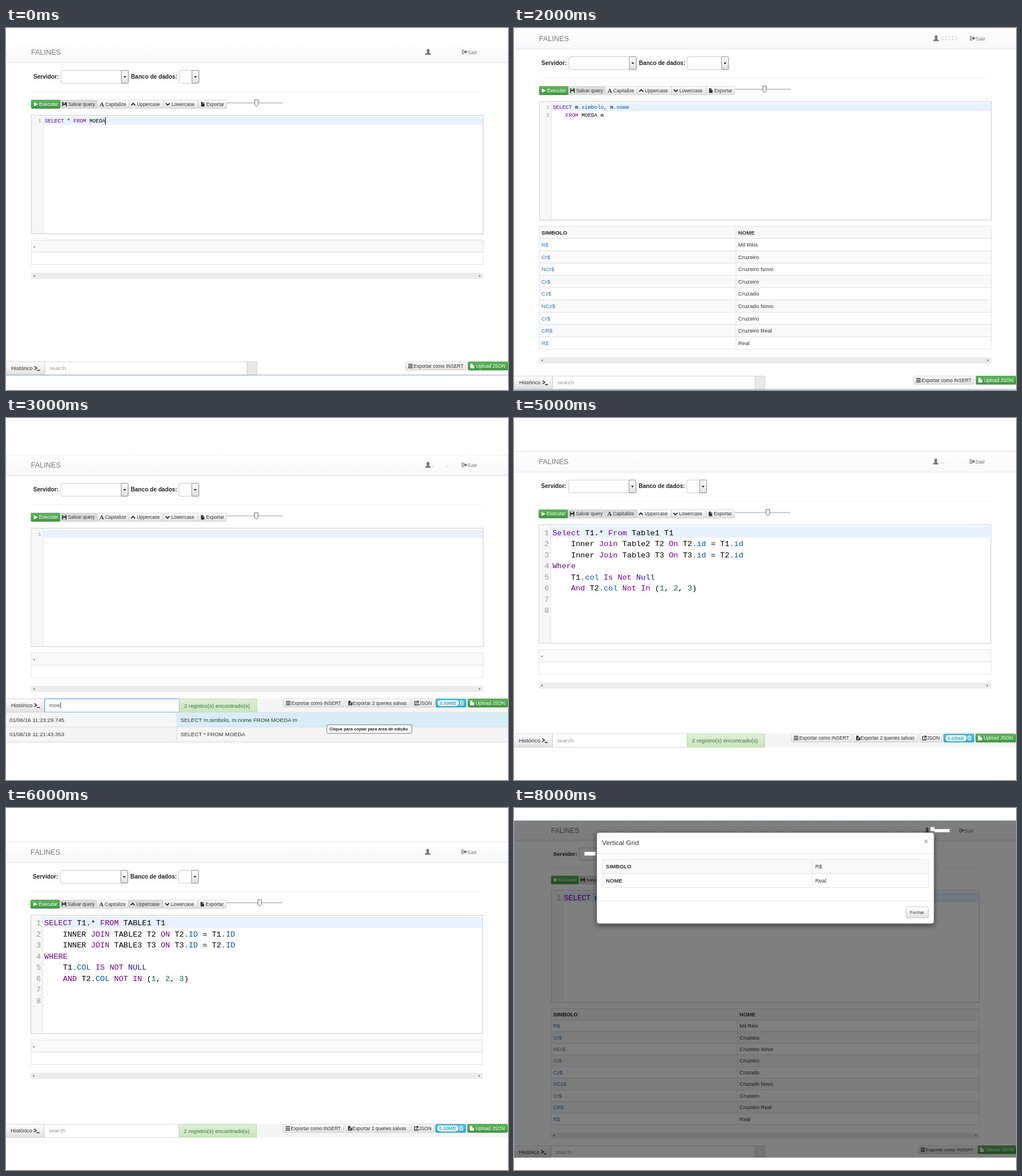
Recreate the animation shown at these times as an HTML page. Size 880x636 px, loop 9000 ms.

```html
<!DOCTYPE html>
<html lang="pt">
<head>
<meta charset="utf-8">
<style>
html, body { margin: 0; width: 100%; height: 100%; overflow: hidden; background: #fff; }
svg { display: block; width: 880px; height: 636px; font-family: "Liberation Sans", Arial, sans-serif; }
text { white-space: pre; }
.mono { font-family: "Liberation Mono", "Courier New", monospace; }
</style>
</head>
<body>
<svg id="stage" viewBox="0 0 880 636">
  <defs>
    <linearGradient id="head" x2="0" y2="1"><stop stop-color="#fff"/><stop offset="1" stop-color="#f8f8f8"/></linearGradient>
    <linearGradient id="plain" x2="0" y2="1"><stop stop-color="#fff"/><stop offset="1" stop-color="#e0e0e0"/></linearGradient>
    <linearGradient id="green" x2="0" y2="1"><stop stop-color="#5cb85c"/><stop offset="1" stop-color="#419641"/></linearGradient>
    <linearGradient id="blue" x2="0" y2="1"><stop stop-color="#5bc0de"/><stop offset="1" stop-color="#2aabd2"/></linearGradient>
    <linearGradient id="badge" x2="0" y2="1"><stop stop-color="#dff0d8"/><stop offset="1" stop-color="#c8e5bc"/></linearGradient>
    <filter id="shadow" x="-5%" y="-10%" width="110%" height="130%"><feDropShadow dx="0" dy="3" stdDeviation="5" flood-opacity=".5"/></filter>
  </defs>
</svg>
<script>
const STEP = 1000;
const stage = document.getElementById('stage');

const rect = (x, y, w, h, fill, stroke = 'none', extra = '') =>
  `<rect x="${x}" y="${y}" width="${w}" height="${h}" fill="${fill}" stroke="${stroke}" stroke-width=".8" ${extra}/>`;
const path = (d, fill, stroke = 'none', width = 1) =>
  `<path d="${d}" fill="${fill}" stroke="${stroke}" stroke-width="${width}"/>`;
const line = (d, color, width = .8) => path(d, 'none', color, width);
// Text is centred vertically on cy.
const text = (x, cy, str, size = 9.7, fill = '#333', extra = '') =>
  `<text x="${x}" y="${cy + size * .35}" font-size="${size}" fill="${fill}" ${extra}>${str}</text>`;
const group = (content, x, y, k = 1) => `<g transform="translate(${x} ${y}) scale(${k})">${content}</g>`;
const BOLD = 'font-weight="bold"';

// Icons are drawn around their own centre.
const icons = {
  play: c => path('M-3-3.6L4 0L-3 3.6Z', c),
  save: c => path('M-4-4H3L4-3V4H-4Z', c) + rect(-2, -4, 3.4, 2.6, '#ddd') + rect(-2.4, 1, 4.8, 3, '#ddd'),
  letter: c => text(-4, 0, 'A', 11, c, BOLD + ' font-family="Liberation Serif, serif"'),
  up: c => line('M-3.4 1.8L0-1.6L3.4 1.8', c, 2),
  down: c => line('M-3.4-1.8L0 1.6L3.4-1.8', c, 2),
  file: c => path('M-3-4H.5V-1H3V4H-3ZM1.2-4L3-1.8H1.2Z', c),
  bars: c => line('M-4-3H4M-4 0H4M-4 3H4', c, 1.6),
  sheet: c => path('M-3.5-4H.5V-1H3.5V4H-3.5Z', c) + line('M-1.8 2.6L1.8-.4M-1.5-.4L1.5 2.6', '#eee', .9),
  share: c => line('M1-3H-3V3.2H3V1', c, 1.3) + path('M0-4H4V0ZM-.8 .3L2.4-3L3.2-2L0 1.2Z', c),
  exit: c => line('M-.5-3.2H-4V3.2H-.5', c, 1.2) + path('M-2-1.2H1V-3.4L5 0L1 3.4V1.2H-2Z', c),
  user: c => `<ellipse cy="-2" rx="2.5" ry="3.3" fill="${c}"/>` + path('M-5 5C-5 2-2 2.6-1.4 .5H1.4C2 2.6 5 2 5 5Z', c),
  trash: c => line('M-3.5-2.6H3.5M-1.3-3.8H1.3M-2.6-2.4V3.7H2.6V-2.4M-1-1V2.4M1-1V2.4', c, 1),
};
const icon = (name, x, y, color = '#333') => group(icons[name](color), x, y);

const skins = { plain: ['url(#plain)', '#ccc', '#333'], active: ['#dcdcdc', '#c8c8c8', '#333'],
  green: ['url(#green)', '#3e8f3e', '#fff'], blue: ['url(#blue)', '#28a4c9', '#fff'] };

function button(x, cy, w, label, iconName, iconX, textX, skin = 'plain') {
  const [fill, stroke, ink] = skins[skin];
  return rect(x, cy - 7.3, w, 14.6, fill, stroke, 'rx="1.5"') + icon(iconName, iconX, cy, ink) + text(textX, cy, label, 8.4, ink);
}

function select(x, w) {
  const right = x + w;
  return rect(x, 50.5, w, 22.5, '#fff', '#bbb', 'rx="2"') + rect(right - 12.2, 50.5, 12.2, 22.5, 'url(#plain)', '#777', 'rx="1"') +
    path(`M${right - 8.6} 60.7h5l-2.5 2.8Z`, '#111');
}

const KEYWORDS = /^(select|from|join|on|where|is|not|and|in)$/i;
function tokenColor(token) {
  if (KEYWORDS.test(token)) return '#770088';
  if (/^null$/i.test(token)) return '#221199';
  if (/^\.\w/.test(token)) return '#0055aa';
  return /^\d+$/.test(token) ? '#116644' : '#000';
}
const highlight = str => str.replace(/\.\w+|\w+|[^\w.]+|\./g, t => `<tspan fill="${tokenColor(t)}">${t}</tspan>`);

function editor({ code, big, caret }) {
  const size = big ? 13.6 : 9.3, pitch = big ? 19.55 : 14;
  const first = big ? 142.3 : 139;
  let out = rect(44.4, 129.3, 792.2, 208, '#fff', '#bbb') + rect(44.8, 129.7, 20.4, 207.2, '#f7f7f7') +
    line('M65.2 129.7V337', '#ddd') + rect(65.6, 132.2, 770.6, pitch, '#e8f2ff');
  code.split('\n').forEach((row, i) => {
    const y = first + i * pitch;
    out += text(62, y, i + 1, size, '#999', 'class="mono" text-anchor="end"') + text(68, y, highlight(row), size, '#000', 'class="mono"');
  });
  return caret ? out + line('M174.3 132.5V146', '#000', 1) : out;
}

const COINS = [['R$', 'Mil Réis'], ['Cr$', 'Cruzeiro'], ['NCr$', 'Cruzeiro Novo'], ['Cr$', 'Cruzeiro'], ['Cz$', 'Cruzado'],
  ['NCz$', 'Cruzado Novo'], ['Cr$', 'Cruzeiro'], ['CR$', 'Cruzeiro Real'], ['R$', 'Real']];

function results(full) {
  const rows = full ? [['SIMBOLO', 'NOME'], ...COINS] : [['-', ''], ['', '']];
  const pitch = 21.57, top = 348.4, bottom = top + rows.length * pitch;
  let out = '';
  rows.forEach(([symbol, name], i) => {
    const y = top + i * pitch, cy = y + 10.8;
    out += rect(44.4, y, 792.2, pitch, i % 2 ? '#fff' : '#f9f9f9', '#ddd') +
      text(48, cy, symbol, 9.7, i ? '#337ab7' : '#222', i ? '' : BOLD) + text(393, cy, name, 9.7, '#333', i ? '' : BOLD);
  });
  if (full) out += line(`M389 ${top}V${bottom}`, '#ddd');
  const y = bottom + 20;
  return out + rect(44, y - 5.4, 793, 10.8, '#ececec') + path(`M50.5 ${y - 2.2}v4.4l-2.6-2.2ZM829.5 ${y - 2.2}v4.4l2.6-2.2Z`, '#777');
}

function page(o) {
  const skin = name => o.active === name ? 'active' : 'plain';
  const thumb = o.thumb || 439;
  return rect(-60, 0, 1000, 36.4, 'url(#head)') + rect(-60, 36.8, 1000, 1.6, '#f8f8f8') + line('M-60 36.4H940', '#e2e2e2') +
    text(44, 18.4, 'FALINES', 12.7, '#777') + icon('user', 740, 18, '#777') + (o.mask || '') +
    icon('exit', 804, 18, '#777') + text(809, 18.4, 'Sair', 9.7, '#777') +
    text(48, 61.2, 'Servidor:', 10.1, '#222', BOLD) + select(96.4, 118) +
    text(219, 61.2, 'Banco de dados:', 10.1, '#222', BOLD) + select(303.6, o.wide ? 72.4 : 34.6) +
    line('M44 88.2H836', '#eee') +
    button(44.3, 110, 50.7, 'Executar', 'play', 52, 58, 'green') +
    button(95.4, 110, 64, 'Salvar query', 'save', 102.5, 109, 'active') +
    button(159.8, 110, 55.6, 'Capitalize', 'letter', 168, 174, skin('Capitalize')) +
    button(215.8, 110, 60.2, 'Uppercase', 'up', 223, 229.5, skin('Uppercase')) +
    button(276.3, 110, 60.6, 'Lowercase', 'down', 283.5, 290, skin('Lowercase')) +
    button(337.2, 110, 49.4, 'Exportar', 'file', 345, 351) +
    line('M387 107.6H486', '#999', 1) + path(`M${thumb - 3.2} 102h6.4v8.5l-3.2 3.2l-3.2-3.2Z`, '#eee', '#666', .9) +
    editor(o) + results(o.rows);
}

function footer({ saved, typed, k = 1 }) {
  const end = 440 / k, field = saved ? 304 : 422.5 / k;
  let left = rect(0, .4, 68, 23.4, 'url(#plain)', '#ccc') + text(9, 12, 'Histórico') +
    line('M50 8.5L54 11.5L50 14.5M54.5 15.5H59.5', '#222', 1.5) +
    rect(68, .4, field - 68, 23.4, '#fff', typed ? '#66afe9' : '#ccc', typed ? 'style="stroke-width:1.4"' : '') +
    text(76, 12, typed || 'search', 9.7, typed ? '#555' : '#999');
  if (typed) left += line('M96 7V17.5', '#000');
  left += saved
    ? rect(field, .4, end - field, 23.4, 'url(#badge)', '#b2dba1') + text(312.5, 12.2, '2 registro(s) encontrado(s)', 9.8, '#3c763d')
    : rect(field, .4, end - field, 23.4, '#e8e8e8', '#ccc');
  const shift = saved ? -214 : 0;
  let right = button(700.6 + shift, 7.8, 106.4, 'Exportar como INSERT', 'bars', 709 + shift, 714.5 + shift) +
    button(810, 7.8, 70, 'Upload JSON', 'sheet', 817.5, 824, 'green');
  if (saved) right += button(596, 7.8, 113.4, 'Exportar 2 queries salvas', 'sheet', 604, 608) +
    button(712.3, 7.8, 38.6, 'JSON', 'share', 720, 724.5) + rect(753.8, .5, 53, 14.6, 'url(#blue)', '#28a4c9', 'rx="1.5"') +
    rect(757, 2.9, 37, 10.4, '#fff', 'none', 'rx="5"') + text(760.5, 8.2, '0.00MB', 8.3, '#31b0d5', BOLD) + icon('trash', 799, 7.8, '#fff');
  return (saved ? rect(440, 0, 442, 24, '#f5f5f5') : '') + group(left, 0, 0, k) + group(right, 880 * (1 - k), 0, k);
}

const bottomLine = y => line(`M0 ${y}H880`, '#86a5c4', 1);
const scene = (x, y, footY, o) => group(page(o), x, y, o.scale) + group(footer(o), x * (o.scale ? 0 : 1), footY);

function historyPanel() {
  const entry = (y, date, query, fill) => rect(-1, y, 301, 26, '#f5f5f5', '#ddd') + rect(300, y, 581, 26, fill, '#ddd') +
    text(6, y + 13, date) + text(306, y + 13, query);
  return rect(0, 517, 880, 54.5, '#f5f5f5') + entry(517.2, '01/06/16 11:23:29.745', 'SELECT m.simbolo, m.nome FROM MOEDA m', '#d9edf7') +
    entry(543, '01/06/16 11:21:43.353', 'SELECT * FROM MOEDA', '#f5f5f5') +
    rect(562.5, 539, 149, 15, '#fff', '#555', 'rx="2"') + text(567, 546.8, 'Clique para copiar para área de edição', 7.5, '#222', BOLD);
}

function modal() {
  const row = (y, key, value, fill) => rect(155, y, 571.4, 24.3, fill, '#ddd') + line(`M522.5 ${y}v24.3`, '#ddd') +
    text(161, y + 12.2, key, 9.6, '#333', BOLD) + text(528, y + 12.2, value, 9.4);
  return rect(145, 43, 591.3, 160.2, '#fff', '#666', 'rx="4" filter="url(#shadow)"') +
    text(154.5, 61.3, 'Vertical Grid', 11.8) + text(718.5, 58.5, '×', 13, '#aaa', BOLD) +
    line('M145.4 80.2H736M145.4 163.3H736', '#e5e5e5') + row(90.8, 'SIMBOLO', 'R$', '#f9f9f9') + row(115.1, 'NOME', 'Real', '#fff') +
    rect(687, 173.6, 39.4, 19.4, 'url(#plain)', '#bbb', 'rx="2"') + text(694, 183.2, 'Fechar', 8.1);
}

const pair = 'SELECT m.simbolo, m.nome\n    FROM MOEDA m';
const joins = `Select T1.* From Table1 T1
    Inner Join Table2 T2 On T2.id = T1.id
    Inner Join Table3 T3 On T3.id = T2.id
Where
    T1.col Is Not Null
    And T2.col Not In (1, 2, 3)

`;
const dashes = line('M749 15.5H777M749 20.5H777', '#bbb').replace('/>', ' stroke-dasharray="4 2"/>');
const joinScene = (x, y, code, active, mask = '', edge = '#ddd') =>
  scene(x, y, y + 496, { code, active, mask, big: true, thumb: 445.5, saved: true }) + line(`M0 ${y}H880`, edge);

const scenes = [
  scene(0, 24, 586, { code: 'SELECT * FROM MOEDA', caret: true }) + line('M.4 28V60', '#e7e7e7') + bottomLine(609.8),
  scene(0, 24, 586, { code: pair }) + line('M.4 28V60', '#e7e7e7') + bottomLine(609.8),
  scene(0, 0, 611, { code: pair, rows: true, wide: true, mask: dashes }) + line('M0 .4H880', '#e7e7e7') + bottomLine(634.8),
  scene(-.3, 64.4, 493, { code: '', saved: true, typed: 'moe', mask: rect(747, 20, 1.4, 1.2, '#999') + rect(774, 20, 1.4, 1.2, '#999') }) +
    rect(.4, 64.7, 879.2, 36, 'none', '#e2e2e2', 'rx="2"') + historyPanel(),
  joinScene(-.6, 58.5, joins.toLowerCase()),
  joinScene(-.6, 58.5, joins, 'Capitalize', rect(748, 20, 2, 1, '#aaa') + rect(752, 20, 3, 1, '#aaa')),
  joinScene(-.9, 59, joins.toUpperCase(), 'Uppercase'),
  joinScene(-1.3, 59, joins.toLowerCase(), 'Lowercase', dashes, '#a9bccb'),
  scene(23.4, 22.3, 593, { code: 'SELECT m.simbolo, m.nome FROM MOEDA m', big: true, rows: true, scale: .947, k: .955 }) +
    rect(0, 22, 880, 592.5, 'rgba(0,0,0,.5)') + rect(0, 614.5, 880, 22, '#fff') +
    line('M.5 22V614.5M0 22.4H880', '#7d96b0') + rect(730, 33.5, 7, 7, '#fff') + rect(737, 37, 26.5, 5.5, '#fff') +
    rect(123.5, 77, 19.5, 6.5, '#fff') + modal(),
];

stage.insertAdjacentHTML('beforeend', scenes.map(s => `<g display="none">${s}</g>`).join(''));
const layers = [...stage.children].slice(1);

const start = performance.now();
function draw(now) {
  const current = Math.floor(Math.max(0, now - start) / STEP) % layers.length;
  layers.forEach((layer, i) => layer.setAttribute('display', i === current ? 'inline' : 'none'));
  requestAnimationFrame(draw);
}
draw(start);
</script>
</body>
</html>
```
